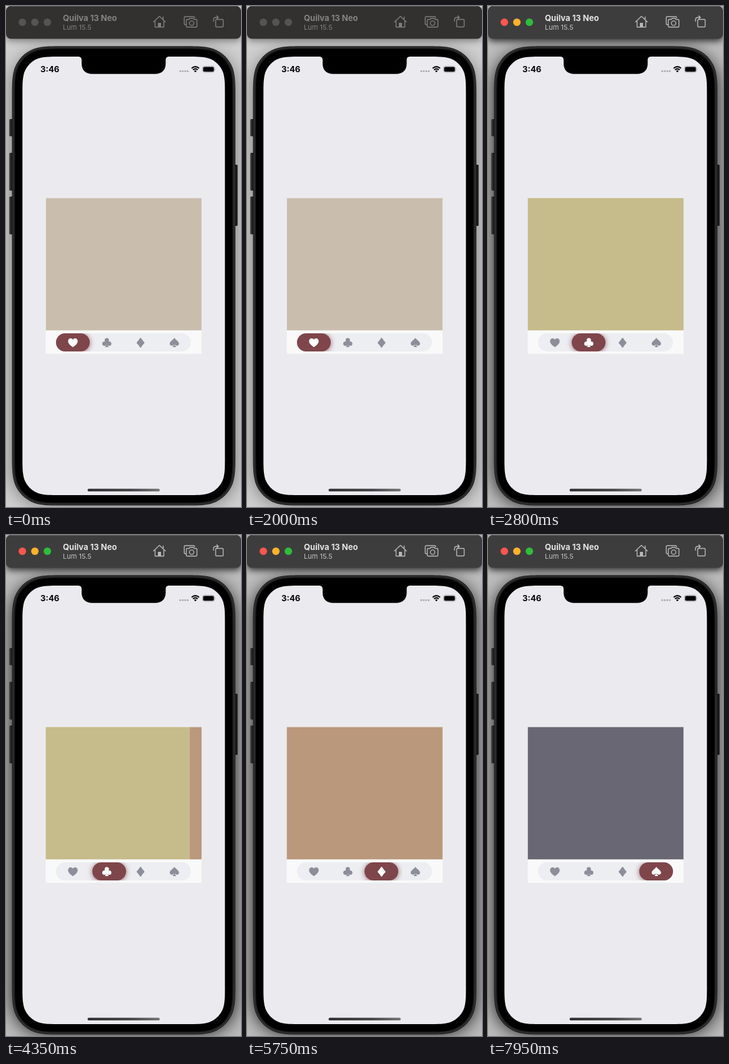
Animation of 376x802 px, one loop 8 s. Source, as an HTML page:

```html
<!DOCTYPE html>
<html lang="en">
<head>
<meta charset="utf-8">
<title>Suit picker</title>
<style>
  html, body { margin: 0; width: 100%; height: 100%; overflow: hidden; background: #cdcdcd; }
  svg { display: block; width: 376px; height: 802px; font-family: Inter, Roboto, sans-serif;
    --bar: #323130; --title: #858483; --sub: #807f7e; --tool: #7f7e7d;
    --d1: #555453; --d2: #555453; --d3: #555453; --shade: .4; --wall: #d0d0d0; }
  svg.active { --bar: #3e3d3d; --title: #e6e5e5; --sub: #c2c1c1; --tool: #b9b8b8;
    --d1: #fb564e; --d2: #fcb32b; --d3: #2fbd3c; --shade: .78; --wall: #bdbdbd; }
  .wall { fill: var(--wall); }
  .shade { opacity: var(--shade); }
  .bar { fill: var(--bar); }
  .title { font-size: 13px; font-weight: 700; fill: var(--title); }
  .sub { font-size: 11px; fill: var(--sub); }
  .tool { fill: none; stroke: var(--tool); stroke-width: 1.4; stroke-linejoin: round; stroke-linecap: round; }
  .tool .solid { fill: var(--tool); stroke: none; }
  .clock { font-size: 13.2px; font-weight: 650; fill: #050505; }
</style>
</head>
<body>
<svg id="stage" viewBox="0 0 376 802">
  <defs>
    <filter id="blur" x="-30%" y="-30%" width="160%" height="160%"><feGaussianBlur stdDeviation="14"/></filter>
    <filter id="barBlur" x="-10%" y="-50%" width="120%" height="200%"><feGaussianBlur stdDeviation="6"/></filter>
    <filter id="glow" x="-50%" y="-80%" width="200%" height="260%"><feGaussianBlur stdDeviation="4"/></filter>
    <linearGradient id="home" x1="0" x2="1">
      <stop offset="0" stop-color="#333"/><stop offset=".6" stop-color="#484848"/><stop offset="1" stop-color="#777"/>
    </linearGradient>
    <linearGradient id="button" x1="0" x2="1">
      <stop offset="0" stop-color="#444"/><stop offset=".5" stop-color="#1e1e1e"/><stop offset="1" stop-color="#111"/>
    </linearGradient>
    <clipPath id="view"><rect x="63.6" y="307.3" width="249.3" height="212.2"/></clipPath>
    <clipPath id="track"><rect x="80" y="524" width="216" height="29" rx="14.5"/></clipPath>
    <clipPath id="lens"><rect id="lensBox" x="80" y="524" width="54" height="29" rx="14.5"/></clipPath>
    <g id="suits">
      <path d="M107 546.3C103 543.4 99.3 540.5 99.3 536.6C99.3 533.9 101.2 532 103.4 532C105 532 106.3 532.8 107 534.2C107.7 532.8 109 532 110.6 532C112.8 532 114.7 533.9 114.7 536.6C114.7 540.5 111 543.4 107 546.3Z"/>
      <g>
        <circle cx="161.3" cy="535" r="3.5"/><circle cx="157.5" cy="540.4" r="3.5"/><circle cx="165.1" cy="540.4" r="3.5"/>
        <path d="M160.2 536H162.4L163 539.5L162 541C162 543 162.8 544.4 164 545.1Q164.5 546.1 163.6 546.1H159Q158.100 546.1 158.6 545.1C159.8 544.4 160.6 543 160.6 541L159.6 539.500Z"/>
      </g>
      <path d="M214.5 531.6Q215.3 530.8 216.1 531.6Q218.6 535.7 221.4 538.4Q221.9 539.1 221.4 539.8Q218.6 542.5 216.1 546.5Q215.3 547.3 214.5 546.5Q212 542.5 209.2 539.8Q208.7 539.1 209.2 538.4Q212 535.7 214.5 531.6Z"/>
      <path d="M269.4 531.2C270.8 533.9 276.9 537 276.9 540.6C276.9 542.5 275.4 543.8 273.7 543.8C272.2 543.8 270.9 543 270.100 541.5C270.100 543.2 270.9 544.4 272 545.1Q272.5 546.1 271.6 546.1H267.2Q266.3 546.1 266.8 545.1C267.9 544.4 268.7 543.2 268.7 541.5C267.9 543 266.6 543.8 265.1 543.8C263.4 543.8 261.9 542.5 261.9 540.6C261.9 537 268 533.9 269.4 531.2Z"/>
    </g>
  </defs>

  <rect class="wall" width="376" height="802"/>
  <rect class="shade" x="8" y="72" width="361" height="728" rx="56" filter="url(#blur)"/>
  <rect class="shade" x="0" y="6" width="376" height="50" rx="8" filter="url(#barBlur)"/>

  <!-- device -->
  <g fill="url(#button)">
    <rect x="5.200" y="181" width="7" height="27.500" rx="1.500"/>
    <rect x="5.200" y="235" width="7" height="60.500" rx="1.500"/>
    <rect x="5.200" y="305" width="7" height="60.500" rx="1.500"/>
    <rect x="364" y="254" width="6.500" height="98" rx="1.500"/>
  </g>
  <g id="shell"></g>
  <path d="M115 79V81C119.500 81 121 83 121 87V92C121 102.500 127 108.700 138 108.700H238.500C249.500 108.700 255.500 102.500 255.500 92V87C255.500 83 257 81 261.500 81V79Z"/>

  <text class="clock" x="55" y="106">3:46</text>
  <g fill="#acacb1">
    <circle cx="278.800" cy="104.300" r="1.500"/><circle cx="282.800" cy="104.300" r="1.500"/>
    <circle cx="286.800" cy="104.300" r="1.500"/><circle cx="290.800" cy="104.300" r="1.500"/>
  </g>
  <g fill="none" stroke="#080808" stroke-width="2">
    <path d="M297 99.800Q303 94.400 309 99.800"/>
    <path d="M299.200 102.300Q303 98.900 306.800 102.300"/>
  </g>
  <path d="M300.900 103.900Q303 102.100 305.100 103.900L303 106.200Z"/>
  <rect x="314.300" y="96.300" width="19.400" height="10" rx="3" fill="none" stroke="#a6a6aa" stroke-width=".8"/>
  <rect x="315.400" y="97.400" width="17.200" height="7.800" rx="2"/>
  <path d="M334.600 99.700Q336.200 101.300 334.600 102.900Z" fill="#98989c"/>
  <rect x="130.500" y="772.700" width="115.500" height="4.400" rx="2.200" fill="url(#home)"/>

  <!-- pager -->
  <rect x="63.600" y="307.300" width="249.300" height="249.500" fill="#f9f9f9"/>
  <g clip-path="url(#view)"><g id="pages"></g></g>
  <rect x="80" y="524" width="216" height="29" rx="14.500" fill="#edeef2"/>
  <g clip-path="url(#track)">
    <rect id="halo" x="80" y="525" width="54" height="29" rx="14.500" fill="#7e464b" opacity=".8" filter="url(#glow)"/>
  </g>
  <use href="#suits" fill="#8c8f99"/>
  <rect id="pill" x="80" y="524" width="54" height="29" rx="14.500" fill="#7e464b"/>
  <g clip-path="url(#lens)"><use href="#suits" fill="#fff"/></g>

  <!-- toolbar -->
  <rect class="bar" width="376" height="52.500" rx="8"/>
  <path d="M8 .5H368" stroke="#fff" stroke-opacity=".18"/>
  <circle cx="26.200" cy="26" r="6" style="fill:var(--d1)"/>
  <circle cx="46.200" cy="26" r="6" style="fill:var(--d2)"/>
  <circle cx="66.200" cy="26" r="6" style="fill:var(--d3)"/>
  <text class="title" x="91" y="24">Quilva 13 Neo</text>
  <text class="sub" x="91" y="38">Lum 15.5</text>
  <g class="tool">
    <path d="M236 25.500L245.500 16.500L255 25.500M238.500 24V33.700H252.500V24M251.500 21.500V17.500"/>
    <path class="solid" d="M243 34V27H248V34Z"/>
    <path d="M288 30H287Q285.200 30 285.200 28.200V18.800Q285.200 17 287 17H300Q301.800 17 301.800 18.800"/>
    <path d="M290 21.500H293L294.200 19.800H299.800L301 21.500H304Q305.500 21.500 305.500 23V32.200Q305.500 33.700 304 33.700H290Q288.500 33.700 288.500 32.200V23Q288.500 21.500 290 21.500Z"/>
    <circle cx="297" cy="27.500" r="3.600"/>
    <rect x="335.500" y="21.500" width="12" height="12" rx="1.200"/>
    <path d="M332 24.500V22Q332 18.300 336 18.300H339.500M337.300 15.800L339.800 18.300L337.300 20.800"/>
  </g>
</svg>
<script>
  const $ = id => document.getElementById(id);
  const LOOP = 8000, WAKE = 2200, PAGE = 249.3, CELL = 54;

  // [time in ms, page position]
  const swipe = [
    [2250, 0], [2300, .06], [2350, .24], [2400, .48], [2450, .68], [2500, .82], [2550, .91], [2650, .98], [2750, 1],
    [4250, 1], [4300, 1.025], [4350, 1.073], [4400, 1.26], [4450, 1.5], [4500, 1.7], [4550, 1.84], [4600, 1.92], [4700, 1.98], [4800, 2],
    [6400, 2], [6450, 2.1], [6500, 2.33], [6550, 2.576], [6600, 2.76], [6650, 2.87], [6700, 2.935], [6800, 2.985], [6900, 3]
  ];

  function add(parent, tag, attrs) {
    const el = document.createElementNS("http://www.w3.org/2000/svg", tag);
    for (const key in attrs) el.setAttribute(key, attrs[key]);
    $(parent).append(el);
  }

  // Rectangle with smooth, continuous-curvature corners of radius r
  const corner = [[0, 1.529], [0, 1.088], [0, .868], [.075, .631], [.169, .373], [.373, .169], [.631, .075], [.868, 0], [1.088, 0], [1.529, 0]];
  function squircle(x, y, w, h, r) {
    const side = (flipX, flipY) => {
      const pts = corner.map(([a, b]) => [flipX ? x + w - a * r : x + a * r, flipY ? y + h - b * r : y + b * r]);
      if (flipX !== flipY) pts.reverse();
      return pts[0] + "C" + pts.slice(1).join(" ");
    };
    return "M" + [side(0, 0), side(1, 0), side(1, 1), side(0, 1)].join("L") + "Z";
  }

  const shell = (inset, r, fill) =>
    add("shell", "path", { d: squircle(9.6 + inset, 64.2 + inset, 357.4 - 2 * inset, 735.4 - 2 * inset, r), fill });
  shell(0, 56, "#1a1a1a");
  shell(1, 55, "#333");
  shell(2.6, 53.5, "#202020");
  shell(4.6, 51.5, "#000");
  shell(16.7, 40, "#ebeaef");

  ["#c9bdad", "#c6bb8b", "#ba987c", "#696773"].forEach((fill, i) =>
    add("pages", "rect", { x: 63.6 + i * PAGE, y: 307.3, width: PAGE, height: 212.2, fill }));

  function position(t) {
    const i = swipe.findIndex(step => step[0] > t);
    if (i === 0) return swipe[0][1];
    if (i < 0) return swipe[swipe.length - 1][1];
    const [t0, p0] = swipe[i - 1], [t1, p1] = swipe[i];
    return p0 + (p1 - p0) * (t - t0) / (t1 - t0);
  }

  function draw(now) {
    const t = now % LOOP, p = position(t);
    $("stage").classList.toggle("active", t >= WAKE);
    $("pages").setAttribute("transform", `translate(${-p * PAGE} 0)`);
    for (const id of ["halo", "pill", "lensBox"]) $(id).setAttribute("x", 80 + p * CELL);
  }

  const start = performance.now();
  function tick() {
    draw(performance.now() - start);
    requestAnimationFrame(tick);
  }
  tick();
</script>
</body>
</html>
```
